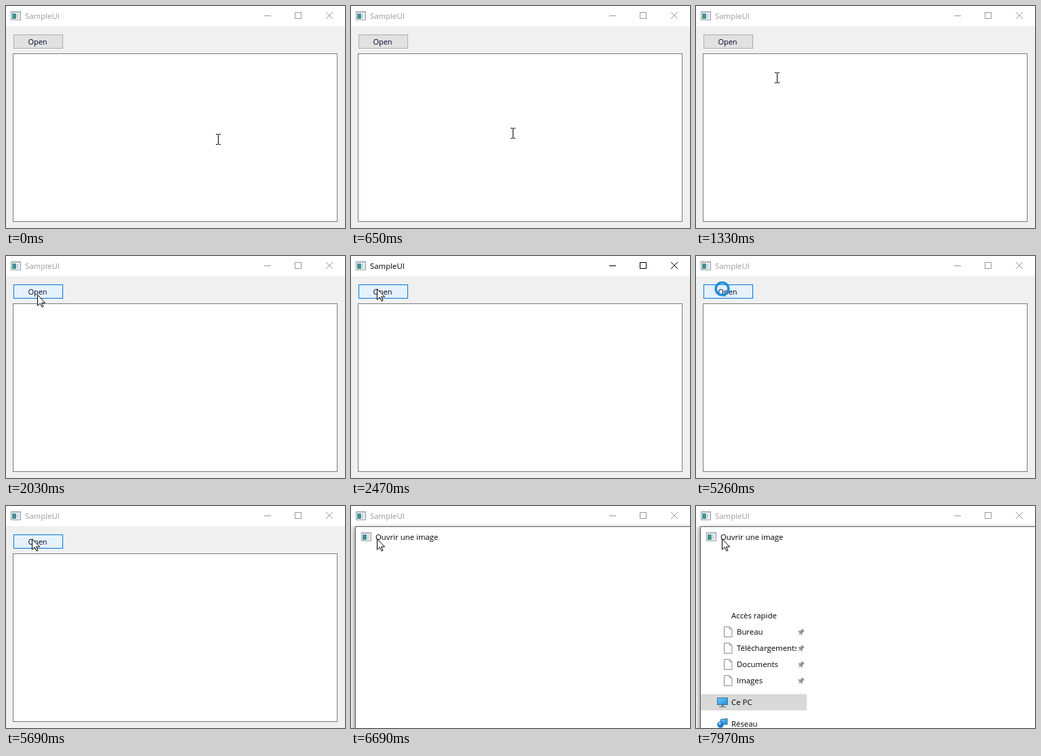
Animation of 499x328 px, one loop 8000 ms. Source, as an HTML page:

```html
<!DOCTYPE html>
<html lang="fr">
<head>
<meta charset="utf-8">
<title>SampleUI</title>
<style>
html, body { margin: 0; width: 100%; height: 100%; overflow: hidden; background: #f0f0f0; }
svg { display: block; }
text { font: 11.4px "Open Sans", "Noto Sans", sans-serif; }
.line { fill: none; stroke: currentColor; }
.crisp { shape-rendering: crispEdges; }
#bar { color: #000; }
#bar.idle { color: #999; }
#button rect { fill: #e1e1e1; stroke: #adadad; }
#button.hover rect { fill: #e5f1fb; stroke: #0078d7; }
#button text { font-size: 11px; fill: #000028; text-anchor: middle; }
#window { filter: drop-shadow(0 2px 3px rgba(0, 0, 0, .55)); }
</style>
</head>
<body>
<svg width="499" height="328" viewBox="0 0 499 328">
  <defs>
    <linearGradient id="teal" x2="0" y2="1">
      <stop stop-color="#4a8fa8"/><stop offset="1" stop-color="#3c9278"/>
    </linearGradient>
    <linearGradient id="sky" x2="1" y2="1">
      <stop stop-color="#6cc9f7"/><stop offset="1" stop-color="#1c8fdc"/>
    </linearGradient>
    <g id="app" class="crisp">
      <path d="M.5 .5h14v12h-14z" fill="#fff" stroke="#929ca5"/>
      <path d="M1 1h13v1H1z" fill="#bcc6ce"/>
      <path d="M2 3h6v8H2z" fill="url(#teal)"/>
      <path d="M9 3h2v8H9z" fill="#b9ccd6"/>
      <path d="M12 3h2v8h-2z" fill="#dce6ea"/>
    </g>
    <path id="page" d="M.5 .5h8l3.500 3.500v11.500h-11.500zM8.500 .5v3.500h3.500" fill="#fff" stroke="#8c8c8c"/>
    <path id="pin" d="M6 0l4 4-1.500 .5-2 2.200.2 2.300-1 .8-2.300-2.300L0 10.500 2.600 6.600.4 4.300l.8-1 2.300.2L5.600 1.500z" fill="#8997a4"/>
  </defs>

  <path d="M0 0h499v30H0z" fill="#fff"/>
  <use href="#app" x="7" y="8"/>
  <g id="bar">
    <text x="28" y="19" fill="currentColor">SampleUI</text>
    <path class="line crisp" d="M380 14.500h10M425.500 9.500h9v9h-9z"/>
    <path class="line" d="M471 9l10 10M481 9l-10 10"/>
  </g>
  <g id="button">
    <rect class="crisp" x="11.500" y="42.500" width="72" height="20"/>
    <text x="46.500" y="57">Open</text>
  </g>
  <path class="crisp" d="M10.500 70.500h477v248h-477z" fill="#fff" stroke="#7a7a7a"/>

  <g id="dialog">
    <path id="window" d="M6 30h520v330H6z" fill="#606060"/>
    <path d="M7 31h492v297H7z" fill="#fff"/>
    <use href="#app" x="15" y="39"/>
    <text x="36" y="50">Ouvrir une image</text>
    <g id="nav">
      <path d="M7 278h156v24H7z" fill="#d9d9d9"/>
      <text x="52" y="166">Accès rapide</text>
      <g id="places"></g>
      <text x="52" y="294">Ce PC</text>
      <text x="52" y="326">Réseau</text>
      <path d="M31.500 283.500h15v10h-15z" fill="url(#sky)" stroke="#3b6f94"/>
      <path d="M37 294h4v2h3v1.500H34V296h3z" fill="#7c8b97"/>
      <path d="M36 315.500l10-1.500v9l-10-1z" fill="url(#sky)" stroke="#2b6fa3"/>
      <circle cx="36" cy="323" r="4.800" fill="#2479c4"/>
      <path d="M33 320l3-1 1 3-3 2z" fill="#8fd0f5"/>
    </g>
  </g>

  <path id="beam" class="line crisp" d="M0 .5h3m1 0h3M3.500 1v14M0 15.500h3m1 0h3"/>
  <path id="arrow" d="M.5 .7v15.800l3.700-3.500 2.800 5.500 2-.9-2.500-5.400h5.100z" fill="#fff" stroke="#000"/>
  <circle id="ring" cx="38.500" cy="48.500" r="9.300" fill="none" stroke="#1f8fd6" stroke-width="3.600"/>
</svg>
<script>
const $ = id => document.getElementById(id);
const show = (id, on) => { $(id).style.display = on ? "" : "none"; };

$("places").innerHTML = ["Bureau", "Téléchargements", "Documents", "Images"].map((name, i) => {
  const y = 178 + 24 * i;
  return `<use href="#page" x="41" y="${y}"/>
    <svg x="60" y="${y - 4}" width="88" height="24"><text y="16">${name}</text></svg>
    <use href="#pin" x="150" y="${y + 3}"/>`;
}).join("");

// Pointer steps: start time, left, top
const steps = [
  [0, 309, 189], [500, 307, 189], [650, 235, 180], [780, 166, 135], [900, 156, 125],
  [1330, 116, 98], [1480, 75, 84], [1600, 69, 82], [1880, 66, 81],
  [2030, 46, 57], [2180, 38, 48]
];

function draw(now) {
  const t = now % 8000;
  const during = (from, to = 8000) => t >= from && t < to;
  const [, x, y] = steps.findLast(step => step[0] <= t);
  const hover = during(2030);
  const busy = during(3360, 3490) || during(5260, 5690);

  for (const id of ["beam", "arrow"]) $(id).setAttribute("transform", `translate(${x} ${y})`);
  show("beam", !hover);
  show("arrow", hover && !busy);
  show("ring", busy);
  show("dialog", during(6690));
  show("nav", during(7970));
  $("button").classList.toggle("hover", hover);
  $("bar").classList.toggle("idle", !during(2470, 3490));
  requestAnimationFrame(draw);
}
draw(performance.now());
</script>
</body>
</html>
```
